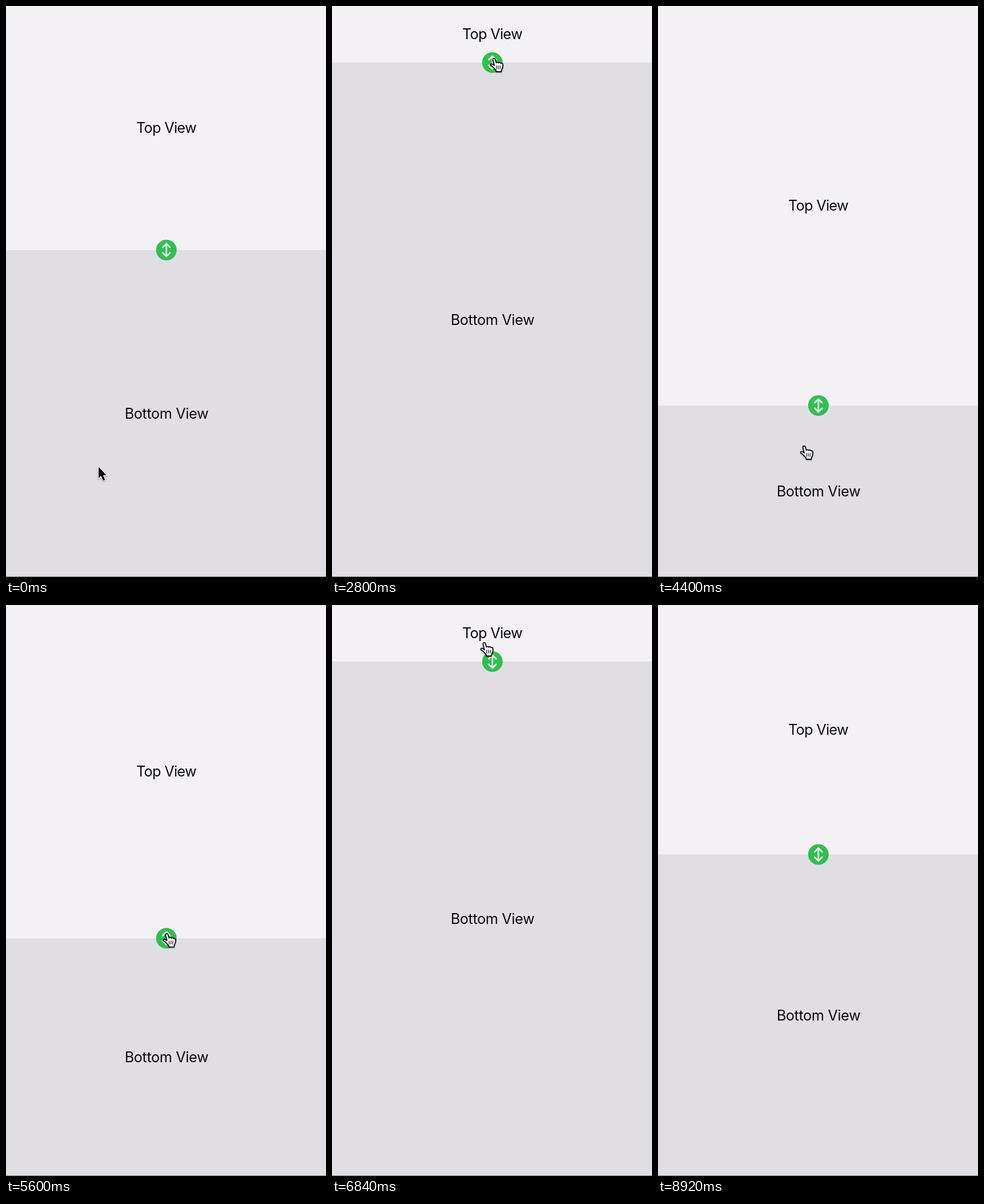
An HTML page that plays this animation: 560x999 px, repeating every 9560 ms.

```html
<!DOCTYPE html>
<html lang="en">
<head>
<meta charset="utf-8">
<title>Split view</title>
<style>
  html, body { margin: 0; width: 100%; height: 100%; overflow: hidden; background: #f3f1f4; }
  svg { display: block; width: 100%; height: 100%; }
  text { font: 25.2px Inter, Roboto, sans-serif; letter-spacing: -0.65px; text-anchor: middle; fill: #0b0b0c; }
  #bottomLabel { letter-spacing: -0.35px; }
  .cursor { filter: drop-shadow(0 1.5px 1.2px rgba(0, 0, 0, .4)); }
</style>
</head>
<body>
<svg viewBox="0 0 560 999">
  <rect width="560" height="999" fill="#f3f1f4"/>
  <rect id="pane" width="560" height="999" fill="#e0dee2"/>
  <rect y="998" width="560" height="1" fill="#7d7c80"/>
  <text id="topLabel" x="280.4">Top View</text>
  <text id="bottomLabel" x="280.9">Bottom View</text>
  <g id="handle">
    <circle r="18" fill="#32be51"/>
    <path d="M0 -10V10M-6.4 -4.8L0 -11.2L6.4 -4.8M-6.4 4.8L0 11.2L6.4 4.8" fill="none"
      stroke="#e2f5e6" stroke-width="2.8" stroke-linecap="round" stroke-linejoin="round"/>
  </g>
  <g id="arrow" class="cursor">
    <path d="M0 0V20L4.5 16L8 24.5L11.3 23L7.8 14.9H13.6Z" fill="#000"
      stroke="#fff" stroke-width="2.6" stroke-linejoin="round" paint-order="stroke"/>
  </g>
  <g id="hand" class="cursor" stroke="#111" stroke-linecap="round" stroke-linejoin="round">
    <path d="M-2.5 2C-3 -.6 .8 -1 1.6 1.2L3.6 7.4C4.5 5.8 7 6 7.6 7.6C8.6 6.2 10.8 6.8 11.4 8.4
      C12.6 7.4 14.6 8 14.8 10C15.2 13 15 17 12.6 19.5L12.4 23H3.6L3 20.5C1 18.5 -2.5 14 -5.5 12.2
      C-7.6 10.6 -5.6 8.6 -3.4 9.8L0 12Z" fill="#fff" stroke-width="1.8"/>
    <path d="M3.8 12.5V18M7 12.5V18M10.2 12.5V18" stroke-width="1.2"/>
  </g>
</svg>
<script>
const LOOP = 9560, STEP = 40;
const HEIGHT = 1000, TOP = 99, BOTTOM = 699;       // divider limits
const GRAB = 1040, DROP = 8240, LAG = 40, GRIP = 16.5;
const BASELINE = 8.8;
const $ = id => document.getElementById(id);
const clamp = (v, lo, hi) => Math.min(hi, Math.max(lo, v));

// Pointer route: travel to a point, then optionally rest there
const route = [{ t: 0, x: 162, y: 806 }];
function go(duration, x, y, rest = 0) {
  const t = route[route.length - 1].t + duration;
  route.push({ t, x, y });
  if (rest) route.push({ t: t + rest, x, y });
}
// reach the handle
go(120, 384, 270, 160);
go(600, 283, 443.5, 160);
// drag up past the upper limit
go(360, 307, 324);
go(760, 284, 92, 640);
// down past the lower limit
go(720, 275, 300);
go(880, 256, 770, 200);
// swing aside and back
go(200, 538, 740);
go(200, 282, 716, 200);
// up again, then settle in the middle
go(840, 281, 248);
go(160, 278, 50);
go(880, 262, 80);
go(560, 247, 485);
go(200, 250, 596);
go(400, 262, 453);
// leave the stage
go(640, 330, 1010, LOOP - 8880);

// Smooth interpolation that never overshoots its points
function along(axis, t) {
  const rise = i => {
    const a = route[i], b = route[i + 1];
    return a && b ? (b[axis] - a[axis]) / (b.t - a.t) : 0;
  };
  const slope = i => {
    const a = rise(i - 1), b = rise(i);
    return a * b > 0 ? 2 * a * b / (a + b) : 0;
  };
  let i = 0;
  while (i < route.length - 2 && t >= route[i + 1].t) i++;
  const from = route[i], to = route[i + 1], span = to.t - from.t;
  const u = (t - from.t) / span, v = 1 - u;
  return from[axis] * v * v * (1 + 2 * u) + to[axis] * u * u * (3 - 2 * u)
    + span * u * v * (slope(i) * v - slope(i + 1) * u);
}

// The divider trails the pointer while it is held
const divider = t => clamp(along("y", clamp(t - LAG, GRAB, DROP)) - GRIP, TOP, BOTTOM);

const isHand = t => (t >= 800 && t < 4600) || (t >= 4960 && t < DROP + LAG);
const move = (el, x, y) => el.setAttribute("transform", `translate(${x.toFixed(2)} ${y.toFixed(2)})`);

function draw(t) {
  const y = divider(t);
  $("pane").setAttribute("y", y);
  $("topLabel").setAttribute("y", y / 2 + BASELINE);
  $("bottomLabel").setAttribute("y", (y + HEIGHT) / 2 + BASELINE);
  move($("handle"), 280.7, y);

  const hand = isHand(t);
  $("hand").style.display = hand ? "" : "none";
  $("arrow").style.display = hand ? "none" : "";
  move($(hand ? "hand" : "arrow"), along("x", t), along("y", t));
}

const start = performance.now();
function tick() {
  const t = (performance.now() - start) % LOOP;
  draw(Math.floor(t / STEP) * STEP);
  requestAnimationFrame(tick);
}
tick();
</script>
</body>
</html>
```
